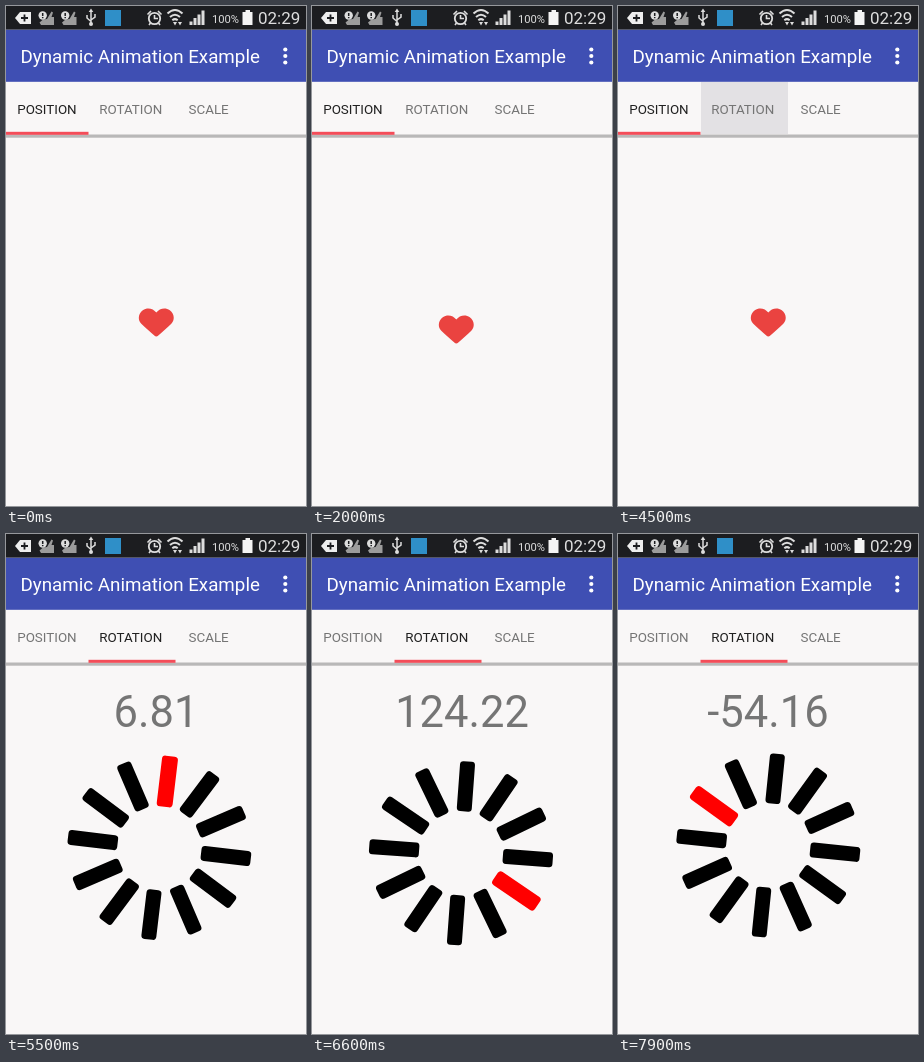
An HTML page that plays this animation: 300x500 px, repeating every 8000 ms.

```html
<!DOCTYPE html>
<html lang="en">
<head>
<meta charset="utf-8">
<title>Dynamic Animation Example</title>
<style>
  html, body { margin: 0; width: 100%; height: 100%; overflow: hidden; background: #f9f7f7; }
  svg { display: block; width: 300px; height: 500px; font-family: Roboto, "Noto Sans", sans-serif; }
</style>
</head>
<body>
<svg viewBox="0 0 300 500">
  <defs>
    <g id="alert">
      <path d="M9 9L13.5 1.500L15 2.500L13.500 7H16V15H3L1.500 12.500L5 9.500Z" fill="#9c9c9c"/>
      <circle cx="4.7" cy="5.5" r="4.2" fill="#ddd"/>
      <path d="M4.700 3V6M4.700 7V8.300" stroke="#1c1d20" stroke-width="1.5"/>
    </g>
  </defs>
  <rect width="300" height="500" fill="#f9f7f7"/>

  <g id="heartPage">
    <path id="heart" fill="#ea4340" d="M0-9.800C-3-13.800-9-15.500-13.500-12C-18.500-8-18.500-2-15 1.500C-11 5.500-6 9.500-2 13.300Q0 15 2 13.300C6 9.500 11 5.500 15 1.500C18.500-2 18.500-8 13.500-12C9-15.500 3-13.800 0-9.800Z"/>
  </g>
  <g id="spinPage">
    <text id="angle" x="150" y="193" font-size="43.5" fill="#757575" text-anchor="middle"></text>
    <g id="spinner"></g>
  </g>

  <rect y="76" width="300" height="52" fill="#f9f7f7"/>
  <rect id="press" x="83" y="76" width="87" height="52" fill="#e3e1e4"/>
  <rect y="128.500" width="300" height="3.200" fill="#b9b8b8"/>
  <rect id="indicator" y="125.800" height="3" fill="#f44d59"/>
  <g font-size="13.4" fill="#757575">
    <text id="positionTab" x="11.2" y="107.5">POSITION</text>
    <text id="rotationTab" x="93.2" y="107.5">ROTATION</text>
    <text x="182.500" y="107.5">SCALE</text>
  </g>

  <rect y="23.600" width="300" height="52.200" fill="#3f4fb3"/>
  <text x="14.5" y="56.700" font-size="18.8" fill="#fff">Dynamic Animation Example</text>
  <g fill="#fff">
    <circle cx="279.3" cy="43.5" r="2.1"/><circle cx="279.3" cy="50" r="2.1"/><circle cx="279.3" cy="56.500" r="2.1"/>
  </g>

  <rect width="300" height="23.600" fill="#1c1d20"/>
  <path d="M9 12L14 6H25V18H14Z" fill="#eee"/>
  <path d="M18.5 8.5V15.5M15 12H22" stroke="#1c1d20" stroke-width="1.8"/>
  <use href="#alert" x="32" y="4"/>
  <use href="#alert" x="54.5" y="4"/>
  <g fill="none" stroke="#ddd" stroke-width="1.5">
    <path d="M85 5V19M81 9V12L85 15.5M89 8V11L85 14"/>
    <circle cx="148.5" cy="12.5" r="5.7" stroke-width="1.8"/>
    <path d="M148.5 9V12.5H152M141.5 8.5L145 5M155.5 8.5L152 5M144.5 17L143 19M152.5 17L154 19" stroke-width="1.6"/>
    <path d="M161.5 7.500Q169 0.500 176.5 7.500M164 11Q169 6.500 174 11M166.300 14.200Q169 12 171.700 14.200" stroke-width="2"/>
  </g>
  <g fill="#ddd">
    <path d="M85 2.5L87.3 6H82.7Z"/><circle cx="85" cy="18" r="2"/>
    <path d="M167 16L169 19.500L171 16ZM172 16L174 19.500L176 16Z"/>
    <path d="M183.500 15.500h3v3.500h-3zM187.500 12h3v7h-3zM191.500 8.500h3v10.500h-3zM195.500 4.500h3v14.500h-3z"/>
    <path d="M239.500 4h4.500v2h2.500v13h-10v-13h3z" fill="#f4f4f4"/>
    <text x="206" y="16.600" font-size="11.2">100%</text>
    <text x="252" y="18" font-size="17">02:29</text>
  </g>
  <rect x="99" y="4" width="16" height="16" fill="#2f8fc8"/>
</svg>
<script>
const LOOP = 8000, STEP = 100;
const $ = id => document.getElementById(id);
const clamp = v => Math.max(0, Math.min(1, v));
const smooth = u => u * u * (3 - 2 * u);

// Each key is [time, values, released]; a released part springs back to zero.
const heartKeys = [
  [0, [0, 0]], [1350, [0, 0]], [1650, [-33, 38]], [1690, [-33, 38], true],
  [2000, [-6, 7]], [2700, [-95, -130]], [2780, [-95, -130], true],
  [3400, [0, 0]], [3800, [-65, 135]], [3900, [-65, 135], true]
];
const spinKeys = [
  [0, [0]], [5400, [0]], [6000, [91.92]], [6100, [91.92]], [6700, [126.8]],
  [6785, [126.8], true], [7400, [0]], [7900, [-54.16]]
];

function spring(ms) {
  const s = ms / 1000, damping = 0.2, omega = Math.sqrt(1500);
  const root = Math.sqrt(1 - damping * damping), phase = omega * root * s;
  const envelope = Math.exp(-damping * omega * s);
  return envelope < 0.012 ? 0 : envelope * (Math.cos(phase) + damping / root * Math.sin(phase));
}

function pose(keys, t) {
  const i = keys.findLastIndex(key => key[0] <= t);
  const [start, values, released] = keys[i], next = keys[i + 1];
  if (released) return values.map(v => v * spring(t - start));
  if (!next) return values;
  const u = smooth((t - start) / (next[0] - start));
  return values.map((v, k) => v + (next[1][k] - v) * u);
}

// The ring sits slightly off its pivot, so it wobbles as it turns.
for (let i = 0; i < 12; i++) {
  const bar = document.createElementNS("http://www.w3.org/2000/svg", "rect");
  const width = i ? 15 : 16, length = i ? 50 : 51;
  const attrs = {
    x: -width / 2, y: -67 - length / 2, width, height: length, rx: 3.5,
    fill: i ? "#000" : "#f00", transform: `translate(3.6 -1.7) rotate(${i * 30})`
  };
  for (const name in attrs) bar.setAttribute(name, attrs[name]);
  $("spinner").append(bar);
}

function draw(time) {
  const t = Math.floor(time / STEP) * STEP;
  const slide = 1 - (1 - clamp((t - 4600) / 450)) ** 5;
  const [x, y] = pose(heartKeys, t);
  const [degrees] = pose(spinKeys, t);

  $("heart").setAttribute("transform", `translate(${150.3 + x} ${316.3 + y})`);
  $("heartPage").setAttribute("transform", `translate(${-300 * slide} 0)`);
  $("spinPage").setAttribute("transform", `translate(${300 * (1 - slide)} 0)`);
  $("spinner").setAttribute("transform", `translate(149.6 315.3) rotate(${degrees})`);
  $("angle").textContent = (degrees || 0).toFixed(2);

  $("indicator").setAttribute("x", 82.5 * slide);
  $("indicator").setAttribute("width", 82.5 + 4.5 * slide);
  $("press").setAttribute("opacity", t < 4500 ? 0 : clamp((4900 - t) / 300));
  $("positionTab").setAttribute("fill", slide < 0.5 ? "#212121" : "#757575");
  $("rotationTab").setAttribute("fill", slide < 0.5 ? "#757575" : "#212121");
}

const began = performance.now();
function tick() {
  draw((performance.now() - began) % LOOP);
  requestAnimationFrame(tick);
}
tick();
</script>
</body>
</html>
```
